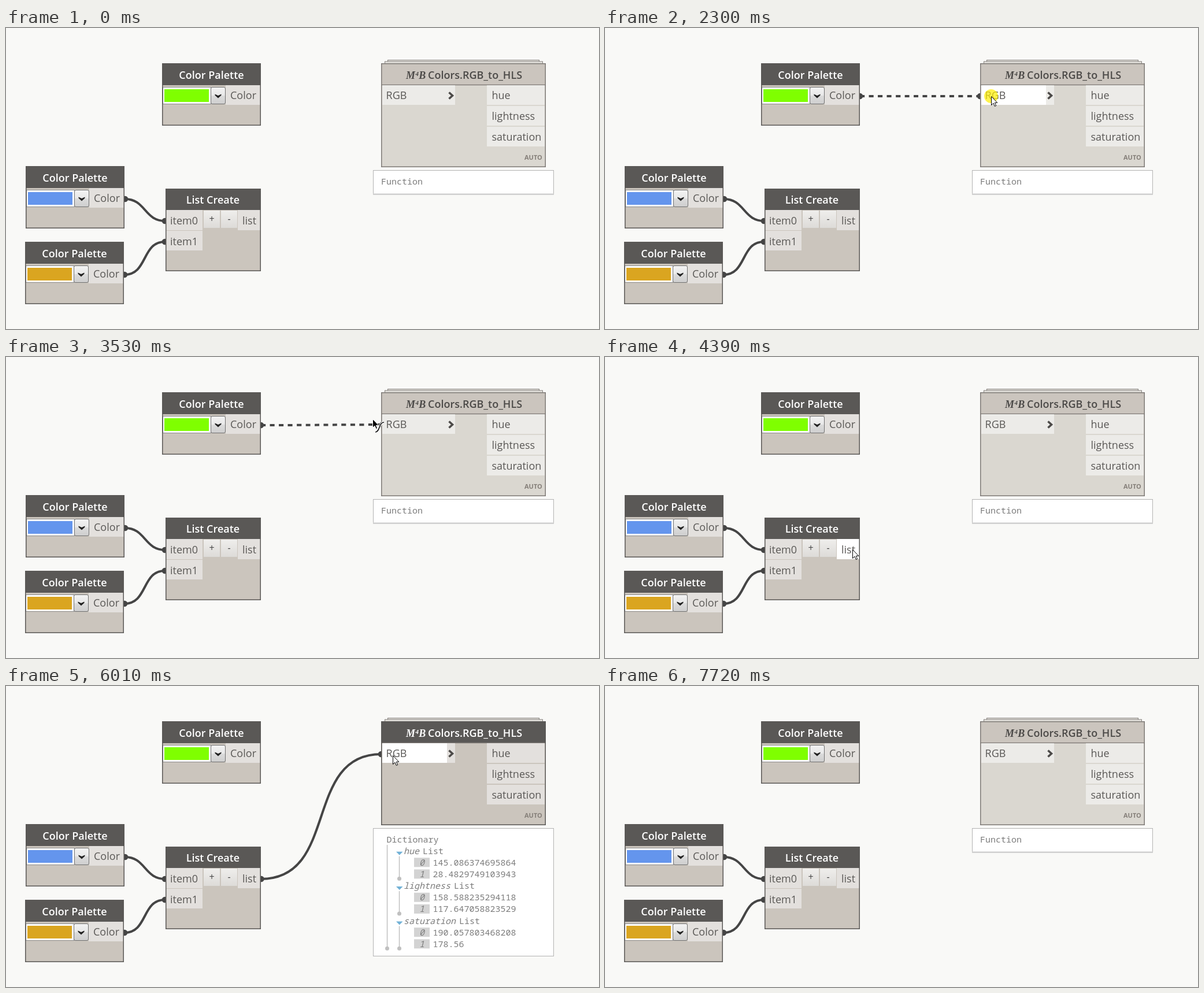
An HTML page that plays this animation: 1026 px wide and 521 px high, repeating every 8030 ms.

```html
<!DOCTYPE html>
<html lang="en">
<head>
<meta charset="utf-8">
<title>Color nodes</title>
<style>
  html, body { margin: 0; width: 100%; height: 100%; overflow: hidden; background: #f9f9f7; }
  svg { display: block; width: 1026px; height: 521px; }
  text { font: 18px "Open Sans", sans-serif; fill: #5a5856; white-space: pre; }
  .title { font-weight: 600; fill: #fff; text-anchor: middle; }
  .name { font-weight: 600; }
  .prefix { font: italic bold 18px "Liberation Serif", serif; }
  .sign { font-size: 16px; fill: #444; text-anchor: middle; }
  .auto { font-size: 11px; font-weight: 700; fill: #857f79; }
  .mono { font: 15px "Noto Sans Mono", monospace; fill: #7c7c7c; }
  .key { font-style: italic; }
  .frame { fill: none; stroke: #5a5856; stroke-width: 1.5; }
  .head { fill: #5a5856; }
  .body { fill: #cbc5bd; }
  .port { fill: #e3e0dd; }
  .wire { fill: none; stroke: #454545; stroke-width: 4; }
  .dot { fill: #454545; }
  .idle .body { fill: #dad7d0; }
  .idle .head { fill: #cbc5be; }
  .idle .port { fill: #ecebe8; }
  .idle .frame { stroke: #7e7a76; }
  .idle .on-head { fill: #4c4a48; }
  .on-head { fill: #fff; }
</style>
</head>
<body>
<svg id="stage" viewBox="0 0 1026 521">
  <defs>
    <linearGradient id="btn" x2="0" y2="1">
      <stop offset="0" stop-color="#f3f3f3"/><stop offset=".5" stop-color="#e8e8e8"/>
      <stop offset=".5" stop-color="#dcdcdc"/><stop offset="1" stop-color="#cecece"/>
    </linearGradient>
    <linearGradient id="soft" x2="0" y2="1">
      <stop offset="0" stop-color="#efeeec"/><stop offset="1" stop-color="#dddbd8"/>
    </linearGradient>
  </defs>
</svg>
<script>
const LOOP = 8030, LAG = 77;
const stage = document.getElementById('stage');

function add(parent, tag, attrs, text) {
  const el = document.createElementNS('http://www.w3.org/2000/svg', tag);
  for (const k in attrs) el.setAttribute(k, attrs[k]);
  if (text !== undefined) el.textContent = text;
  parent.append(el);
  return el;
}
const rect = (p, x, y, width, height, attrs) => add(p, 'rect', { x, y, width, height, ...attrs });
const label = (p, x, y, text, cls = '') => add(p, 'text', { x, y, class: cls }, text);
const path = (p, d, attrs) => add(p, 'path', { d, ...attrs });
const group = (p, attrs) => add(p, 'g', attrs);
const show = (el, on) => el.setAttribute('display', on ? 'inline' : 'none');

function curve([x0, y0], [x1, y1]) {
  const off = 0.45 * Math.hypot(x1 - x0, y1 - y0);
  return `M${x0} ${y0}C${x0 + off} ${y0} ${x1 - off} ${y1} ${x1} ${y1}`;
}

function makeWire(from, to) {
  const g = group(stage);
  const line = path(g, '', { class: 'wire' });
  const dots = [0, 1].map(() => add(g, 'circle', { r: 5.3, class: 'dot' }));
  const set = (end, dashed) => {
    line.setAttribute('d', curve(from, end));
    line.setAttribute('stroke-dasharray', dashed ? '8 7.5' : 'none');
    [from, end].forEach(([x, y], i) => {
      dots[i].setAttribute('cx', x);
      dots[i].setAttribute('cy', y);
    });
  };
  set(to, false);
  return { g, set };
}

function nodeBox(g, w, h, headH) {
  rect(g, 0, 0, w, h, { class: 'body' });
  rect(g, 0, 0, w, headH, { class: 'head' });
}
const border = (g, w, h) => rect(g, .75, .75, w - 1.5, h - 1.5, { class: 'frame' });

function palette(x, y, color) {
  const g = group(stage, { transform: `translate(${x} ${y})` });
  nodeBox(g, 171, 108, 38);
  const port = rect(g, 110, 38, 60, 34, { class: 'port' });
  rect(g, 1.5, 41.5, 83, 29, { fill: '#fff', stroke: '#8b8b8b' });
  rect(g, 4, 45, 77, 22, { fill: color });
  rect(g, 84.5, 41.5, 25, 29, { rx: 2.5, fill: 'url(#btn)', stroke: '#707070' });
  path(g, 'M91.5 53.5L97 56 102.500 53.5V55.500L97 60.500 91.500 55.500Z', { fill: '#222' });
  label(g, 85.5, 27, 'Color Palette', 'title');
  label(g, 118, 62, 'Color');
  border(g, 171, 108);
  return port;
}

function listNode() {
  const g = group(stage, { transform: 'translate(276 278)' });
  nodeBox(g, 165, 143, 37);
  rect(g, 1, 37, 63, 35, { class: 'port' });
  rect(g, 1, 73, 63, 34, { class: 'port' });
  const port = rect(g, 125, 37, 39, 35, { class: 'port' });
  [['+', 66], ['-', 96]].forEach(([sign, x]) => {
    rect(g, x, 38, 28, 30, { fill: 'url(#soft)' });
    label(g, x + 14, 58, sign, 'sign');
  });
  label(g, 82, 26, 'List Create', 'title');
  label(g, 8, 62, 'item0');
  label(g, 8, 98, 'item1');
  label(g, 133, 62, 'list');
  border(g, 165, 143);
  return port;
}

function convertNode() {
  const g = group(stage, { transform: 'translate(649 61)' });
  const edge = { fill: '#e4e2dd', stroke: '#86827e' };
  rect(g, 11.5, -5.5, 262, 8, edge);
  rect(g, 6.5, -3, 273, 8, edge);
  nodeBox(g, 285, 180, 37.5);
  rect(g, 0, 36.8, 285, 1.4, { fill: '#7e7a76' });
  rect(g, 2, 38, 126, 34, { class: 'port' });
  const hot = rect(g, 2, 38, 112, 34, { fill: '#fff' });
  path(g, 'M117.500 50.500L123.500 56 117.500 61.500', { fill: 'none', stroke: '#4c4a48', 'stroke-width': 3.6 });
  label(g, 8.5, 62, 'RGB');
  ['hue', 'lightness', 'saturation'].forEach((name, i) => {
    rect(g, 183, 38 + 36 * i, 100, 34, { class: 'port' });
    label(g, 191.5, 62 + 36 * i, name);
  });
  label(g, 43, 27, 'M⁴B', 'prefix on-head');
  label(g, 81, 27, 'Colors.RGB_to_HLS', 'name on-head');
  label(g, 248, 167, 'AUTO', 'auto');
  border(g, 285, 180);
  return { g, hot };
}

function emptyPreview() {
  const g = group(stage);
  rect(g, 635.5, 246.5, 312, 41, { fill: '#fff', stroke: '#b3b3b3' });
  rect(g, 635, 286.5, 313, 2.5, { fill: '#cfcfcf' });
  label(g, 649, 271, 'Function', 'mono');
  return g;
}

function listPreview(columns) {
  const g = group(stage), grey = '#c0c0c0', pitch = 20.15;
  const rows = 1 + Object.values(columns).reduce((n, c) => n + 1 + c.length, 0);
  const height = 19 + pitch * rows + .5;
  rect(g, 635.5, 246.5, 312, height, { fill: '#fff', stroke: '#b3b3b3' });
  const stem = (x, top, bottom) => {
    rect(g, x - .7, top, 1.5, bottom - top, { fill: grey });
    add(g, 'circle', { cx: x, cy: bottom, r: 3.5, fill: grey });
  };
  let y = 265.5;
  label(g, 658.5, y + 5, 'Dictionary', 'mono');
  stem(659.5, 275, y + (rows - 1) * pitch + 7.5);
  for (const [key, values] of Object.entries(columns)) {
    y += pitch;
    label(g, 688, y + 5, key, 'mono key');
    label(g, 694 + 9 * key.length, y + 5, 'List', 'mono');
    path(g, `M675 ${y + 1}h11.500l-5.750 6z`, { fill: '#71b1d6' });
    stem(680.5, y + 9, y + pitch * values.length + 7.5);
    values.forEach((v, i) => {
      y += pitch;
      rect(g, 706, y - 8.5, 27, 16, { fill: '#d3d3d3' });
      label(g, 715, y + 5, i, 'mono key');
      label(g, 738.5, y + 5, v, 'mono');
    });
  }
  return g;
}

makeWire([206, 296], [275, 334]);
makeWire([205, 427], [275, 370]);
const wires = [
  { ...makeWire([441, 118], [649, 118]), drags: [[1690, 2380], [3300, 3910]], solid: [2380, 3300] },
  { ...makeWire([441.5, 334], [649, 118]), drags: [[4700, 5550], [6790, 7330]], solid: [5550, 6790] }
];
const colorPort = palette(270, 61, '#7fff00');
palette(34, 239, '#6495ed');
palette(33, 370, '#daa520');
const listPort = listNode();
const convert = convertNode();
const empty = emptyPreview();
const single = listPreview({ hue: ['59.8281045751634'], lightness: ['120'], saturation: ['240'] });
const pair = listPreview({
  hue: ['145.086374695864', '28.4829749103943'],
  lightness: ['158.588235294118', '117.647058823529'],
  saturation: ['190.057803468208', '178.56']
});

const glow = add(stage, 'circle', { r: 12, fill: '#ffee00', 'fill-opacity': .7 });
const pointer = group(stage);
const arrow = path(pointer, 'M.5 .5V15.500L4 12.200 6.300 17.500 8.700 16.500 6.400 11.300H10.800Z', { 'stroke-width': 1 });
const hook = group(pointer);
const hookLine = 'M5 23C13 23 11 6 20 6';
path(hook, hookLine, { fill: 'none', stroke: '#fff', 'stroke-width': 3.5 });
path(hook, hookLine, { fill: 'none', stroke: '#111', 'stroke-width': 1.6 });

// The screen refreshes only at these moments: [first, last, steps].
const bursts = [
  [760, 1530, 11], [1610, 2380, 11], [2460, 2460, 1], [3070, 3070, 1], [3300, 4080, 11],
  [4160, 4460, 5], [4630, 5400, 11], [5470, 5780, 5], [5930, 6010, 2], [6790, 7570, 11], [7650, 7720, 2]
];
const ticks = [0];
for (const [a, b, n] of bursts)
  for (let i = 0; i < n; i++)
    ticks.push(n < 2 ? a : Math.round((a + (b - a) * i / (n - 1)) / 10) * 10);

// Pointer tip: time, x, y
const route = [
  [760, 914, 160], [1150, 543, 118], [1380, 414, 117], [1690, 408, 118],
  [2230, 668, 118], [2300, 668, 118], [2380, 673, 118], [2460, 673, 118], [3070, 669, 118],
  [3300, 669, 118], [3380, 666, 118], [3460, 650, 117], [3530, 634, 107], [3610, 612, 124],
  [3840, 577, 182], [4080, 562, 219], [4390, 428, 333], [4460, 424, 337],
  [4780, 424, 337], [5100, 597, 185], [5170, 629, 150], [5320, 668, 121], [5550, 668, 121],
  [5780, 657, 122], [5930, 664, 121], [6010, 669, 120],
  [6870, 669, 120], [6940, 650, 117], [7020, 612, 112], [7180, 566, 128], [7330, 562, 135],
  [7410, 602, 142], [7570, 773, 150], [7650, 985, 135]
];
const clicks = [[1610, 1760], [2220, 2380], [3300, 3450], [4630, 4780], [5470, 5620], [6790, 6940]];

const within = (t, [a, b]) => t >= a && t < b;
const inBox = ([x, y], l, t, r, b) => x >= l && x < r && y >= t && y < b;

function pointerAt(t) {
  const i = route.findIndex(k => k[0] > t);
  if (i < 0) return route[route.length - 1].slice(1);
  if (i === 0) return route[0].slice(1);
  const [t0, x0, y0] = route[i - 1], [t1, x1, y1] = route[i];
  const p = (t - t0) / (t1 - t0);
  return [x0 + (x1 - x0) * p, y0 + (y1 - y0) * p];
}

function draw(now) {
  const time = now % LOOP;
  const t = ticks.reduce((last, k) => k <= time ? k : last, 0);
  const tip = pointerAt(t);
  const visible = within(t, [760, 7720]);
  const overColor = visible && inBox(tip, 380, 99, 441, 133);
  const overList = visible && inBox(tip, 401, 315, 441, 350);
  const overInput = visible && inBox(tip, 651, 99, 763, 133);
  const hover = overColor || overList || overInput;

  let dragging = false;
  for (const w of wires) {
    const drag = w.drags.some(d => within(t, d)), solid = within(t, w.solid);
    show(w.g, drag || solid);
    w.set(solid || overInput ? [649, 118] : pointerAt(t - LAG), drag);
    dragging ||= drag;
  }

  colorPort.style.fill = overColor ? '#fff' : '';
  listPort.style.fill = overList ? '#fff' : '';
  show(convert.hot, overInput);
  const active = within(t, [2380, 3380]) || within(t, [5550, 6870]);
  convert.g.setAttribute('class', active ? '' : 'idle');
  const one = within(t, [2460, 3380]), two = within(t, [5620, 6870]);
  show(empty, !one && !two);
  show(single, one);
  show(pair, two);

  const at = `translate(${tip[0]} ${tip[1]})`;
  pointer.setAttribute('transform', at);
  glow.setAttribute('transform', at);
  show(pointer, visible);
  show(glow, clicks.some(c => within(t, c)));
  show(hook, dragging && !hover);
  arrow.setAttribute('fill', hover ? '#fff' : '#000');
  arrow.setAttribute('stroke', hover ? '#000' : '#fff');
}

const start = performance.now();
function loop() {
  draw(performance.now() - start);
  requestAnimationFrame(loop);
}
loop();
</script>
</body>
</html>
```
